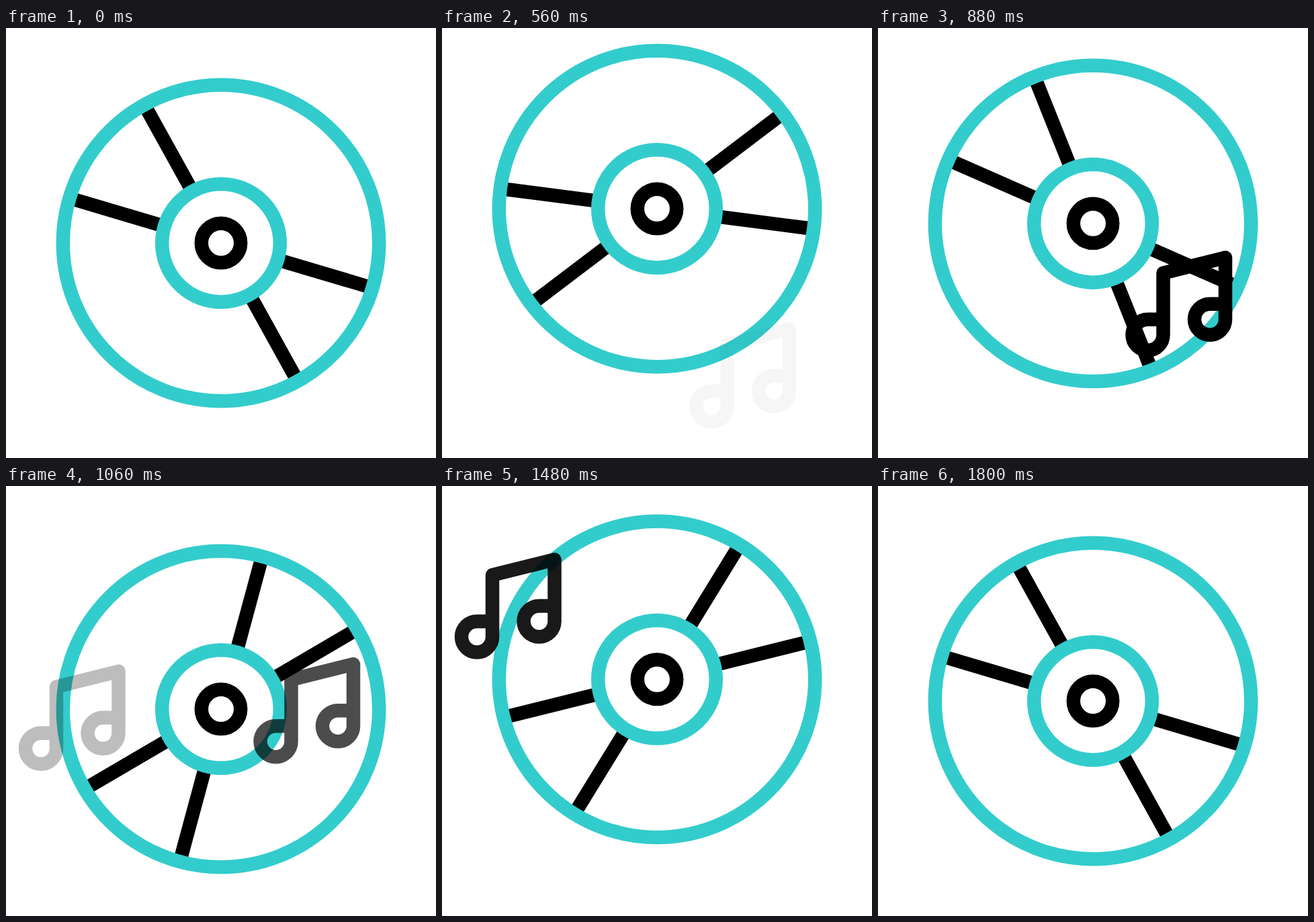
Write an HTML page that moves like this. It is 640x640 px and loops after 2.4 s.

```html
<!DOCTYPE html>
<html>
<head>
<meta charset="utf-8">
<style>
html, body { margin: 0; width: 100%; height: 100%; overflow: hidden; background: #fff; }
svg { display: block; width: 100%; height: 100%; fill: none; stroke: #000; stroke-width: 20.5; }
.ring { stroke: #33cccc; }
.note { stroke-linecap: round; stroke-linejoin: round; }
</style>
</head>
<body>
<svg viewBox="0 0 640 640">
  <g id="disc">
    <g id="spokes">
      <path id="spoke" d="M93 0H227M-93 0H-227" transform="rotate(16.5)"/>
      <use href="#spoke" transform="rotate(44.5)"/>
    </g>
    <circle class="ring" r="235.2"/>
    <circle class="ring" r="87.8"/>
    <circle r="29.2"/>
  </g>
  <path class="note" id="right" d="M424.5 435H401.5a23 23 0 1 0 23 23V366L517 343V435a23 23 0 1 1-23-23H517"/>
  <path class="note" id="left"/>
</svg>
<script>
const LOOP = 2400;
const el = id => document.getElementById(id);
const clamp = u => Math.min(1, Math.max(0, u));
el('left').setAttribute('d', el('right').getAttribute('d'));

// Cubic ease with handles (x1, 0) and (x2, 1)
function ease(u, x1, x2) {
  let lo = 0, hi = 1;
  for (let i = 0; i < 30; i++) {
    const s = (lo + hi) / 2, r = 1 - s;
    if (3 * r * r * s * x1 + 3 * r * s * s * x2 + s * s * s < u) lo = s; else hi = s;
  }
  return lo * lo * (3 - 2 * lo);
}

// Keys: [end time, end value, x1, x2], starting from 0 at time 0
function track(keys, t) {
  let t0 = 0, v0 = 0;
  for (const [t1, v1, x1, x2] of keys) {
    if (t < t1) return v0 + (v1 - v0) * ease((t - t0) / (t1 - t0), x1, x2);
    t0 = t1;
    v0 = v1;
  }
  return v0;
}

const bob = [
  [675, -58, .167, .833],
  [1161, 24, .333, .75],
  [1474, -32.3, .25, .75],
  [1800, 0, .2, .8]
];
const spin = [
  [663, -60, .167, .833],
  [1717, 360, .167, .833]
];

function note(id, x, y, start, t) {
  const life = 640, fade = 190, age = t - start;
  const rise = 206 * ease(clamp(age / life), 1 / 3, 2 / 3);
  el(id).setAttribute('transform', `translate(${x} ${y - rise})`);
  el(id).setAttribute('opacity', clamp(Math.min(age, life - age) / fade));
}

const begin = performance.now();
function draw() {
  const t = (performance.now() - begin) % LOOP;
  el('disc').setAttribute('transform', `translate(320 ${320 + track(bob, t)})`);
  el('spokes').setAttribute('transform', `rotate(${track(spin, t)})`);
  note('right', 0, 105.2, 554, t);
  note('left', -349.5, -63.7, 1012, t);
  requestAnimationFrame(draw);
}
draw();
</script>
</body>
</html>
```
